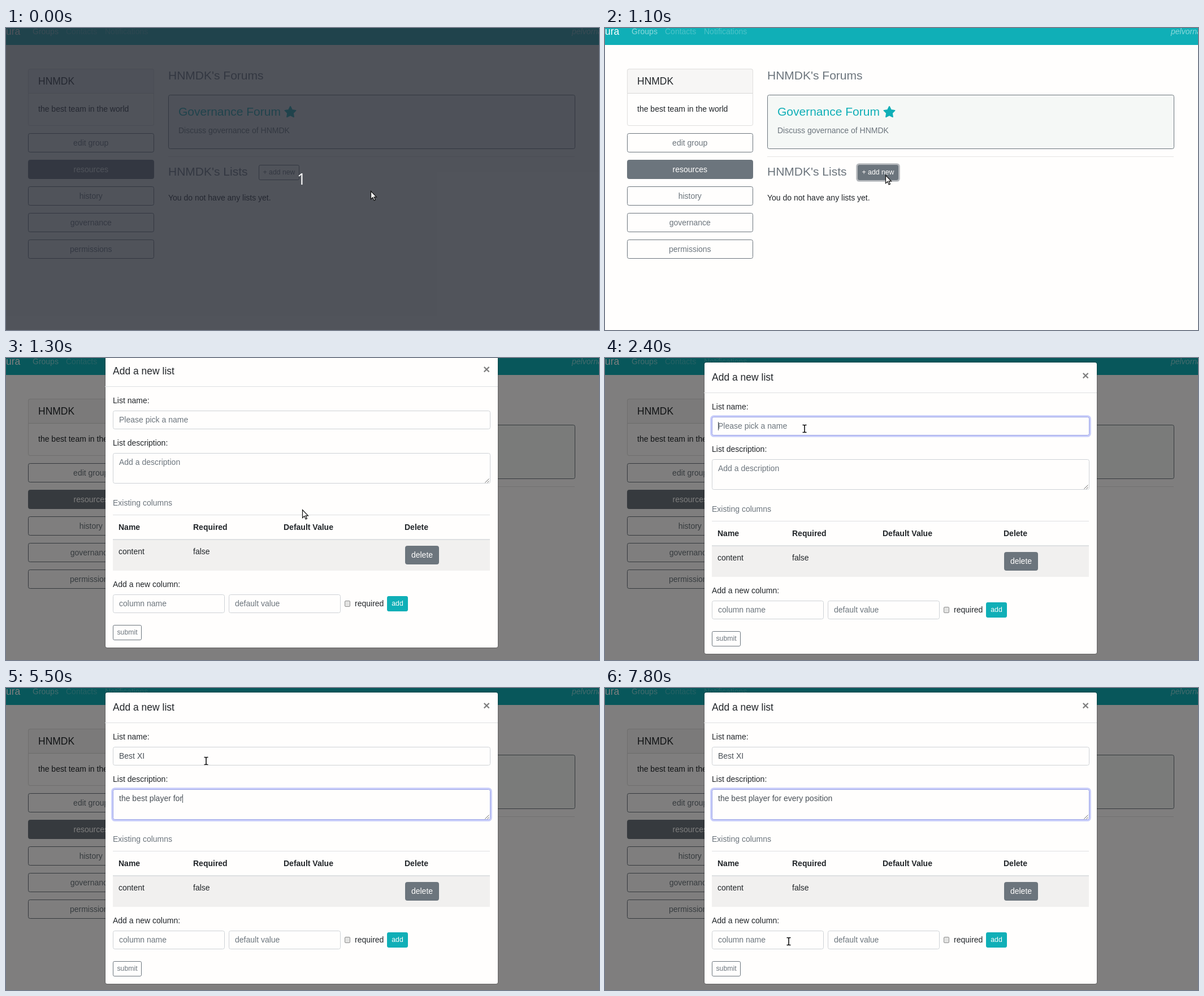
These frames come from a looping animation (1049x534 px, 8 s). An HTML page:

```html
<!DOCTYPE html>
<html lang="en">
<head>
<meta charset="utf-8">
<title>Add a new list</title>
<style>
  html, body { margin: 0; width: 100%; height: 100%; overflow: hidden; background: #fffefd; }
  body { position: relative; font: 14px/30px "Liberation Sans", Arial, sans-serif; color: #212529; }
  div { position: absolute; box-sizing: border-box; white-space: pre; }
  svg { position: absolute; left: 0; top: 0; overflow: visible; }
  .layer { inset: 0; }
  .title { font-size: 17.5px; }
  .heading { font-size: 21px; color: #6c757d; }
  .muted { color: #6c757d; }
  .teal { color: #10afb7; }
  .bold { font-weight: 700; }
  .close { font-size: 21px; font-weight: 700; color: #7f7f7f; }
  .nav { color: rgba(255, 255, 255, .52); }
  .faint { color: rgba(255, 255, 255, .26); }
  .white { color: #fff; }
  .italic { font-style: italic; }
  .bar { background: #10afb7; }
  .card { border: 1px solid rgba(0, 0, 0, .125); border-radius: 3.5px; }
  .cap { background: rgba(0, 0, 0, .03); border-bottom: 1px solid rgba(0, 0, 0, .125); }
  .forum { background: #f5f8f6; border: 1px solid #6c757d; border-radius: 3.5px; }
  .rule { background: rgba(0, 0, 0, .1); }
  .line { background: #dee0e2; }
  .stripe { background: #f1f0ef; }
  .button { border: 1px solid #6c757d; border-radius: 3.5px; text-align: center; color: #6c757d; }
  .small { font-size: 12.25px; border-radius: 2.8px; }
  .filled { background: #6c757d; color: #fffefd; }
  .primary { background: #10afb7; border-color: #10afb7; color: #fffefd; }
  .field { background: #fffefd; border: 1px solid #ced2d6; border-radius: 3.5px; }
  .check { background: #e2e2e1; border: 1px solid #8f8f8f; border-radius: 2px; }
  .panel { background: #fffefd; border: 1px solid rgba(0, 0, 0, .2); border-radius: 4.2px; background-clip: padding-box; }
  .typed { color: #495057; }
  .typed i { display: inline-block; width: 1px; height: 15px; margin-right: -1px; vertical-align: -3px; background: #495057; }
  #backdrop { background: #000; }
  #shade { background: rgba(37, 41, 51, .8); }
  #count { left: 515px; top: 252px; color: #fff; font: 27px/30px "Open Sans", "Noto Sans", sans-serif; }
</style>
</head>
<body>
<div class="layer" id="page"></div>
<div class="layer" id="backdrop"></div>
<div class="layer" id="modal"></div>
<div class="layer" id="shade"><div id="count">1</div></div>
<svg width="1049" height="534">
  <path id="arrow" d="M.5 .5V14.6L3.8 11.6 6.2 16.9 8.4 15.9 6.1 10.8H10.4Z" fill="#fff" stroke="#111" stroke-width="1.2"/>
  <g id="beam" fill="none">
    <path d="M-3.5-6.5H-1L0-5.5 1-6.5H3.5M0-5.5V5.5M-3.5 6.5H-1L0 5.5 1 6.5H3.5" stroke="#fff" stroke-width="3.4"/>
    <path d="M-3.5-6.5H-1L0-5.5 1-6.5H3.5M0-5.5V5.5M-3.5 6.5H-1L0 5.5 1 6.5H3.5" stroke="#111" stroke-width="1.6"/>
  </g>
</svg>
<script>
const $ = id => document.getElementById(id);

// y is the middle of the text line
const text = (x, y, label, cls = '', id = '') =>
  `<div id="${id}" class="${cls}" style="left:${x}px;top:${y - 15}px">${label}</div>`;
const box = (x, y, w, h, cls, label = '', id = '') =>
  `<div id="${id}" class="${cls}" style="left:${x}px;top:${y}px;width:${w}px;height:${h}px;line-height:${h - 2}px">${label}</div>`;

const team = 'HNMDK';
const star = Array.from({ length: 10 }, (_, i) => {
  const r = i % 2 ? 5 : 10, a = i * Math.PI / 5;
  return [503 + r * Math.sin(a), 149 - r * Math.cos(a)].map(v => v.toFixed(1)).join();
}).join(' ');

$('page').innerHTML = [
  box(0, 0, 1049, 30, 'bar'),
  text(0, 6, 'ura', 'title white'),
  text(47, 6, 'Groups', 'nav'),
  text(106, 6, 'Contacts', 'faint'),
  text(175, 6, 'Notifications', 'faint'),
  text(1001, 6, 'pelvorna', 'nav italic'),
  box(39, 72, 222.5, 101, 'card'),
  box(40, 73, 220.5, 43, 'cap'),
  text(57, 94, team, 'title'),
  text(57, 143, 'the best team in the world'),
  ...['edit group', 'resources', 'history', 'governance', 'permissions'].map((label, i) =>
    box(39, 186 + 47 * i, 222.5, 34, i === 1 ? 'button filled' : 'button', label)),
  text(287, 84, team + "'s Forums", 'heading'),
  box(287, 118, 719.5, 95.5, 'forum'),
  text(305, 148, 'Governance Forum', 'heading teal'),
  `<svg><polygon points="${star}" fill="#10afb7" stroke="#10afb7" stroke-width="2" stroke-linejoin="round"/></svg>`,
  text(305, 181, 'Discuss governance of ' + team, 'muted'),
  box(287, 227, 719, 1, 'rule'),
  text(287, 254, team + "'s Lists", 'heading'),
  box(447, 242, 72, 27, 'button small', '+ add new', 'addNew'),
  text(287, 300, 'You do not have any lists yet.')
].join('');

$('modal').innerHTML = [
  box(174.5, 7, 696, 517, 'panel'),
  text(189, 34, 'Add a new list', 'title'),
  text(844, 31, '×', 'close'),
  box(175, 61, 695, 1, 'line'),
  text(189, 86, 'List name:'),
  box(189, 104, 668, 33, 'field', '', 'nameField'),
  text(200, 120, '', 'typed', 'nameText'),
  text(189, 161, 'List description:'),
  box(189, 179, 668, 54, 'field', '', 'noteField'),
  text(200, 195, '', 'typed', 'noteText'),
  '<svg><path d="M847.5 231.5l7-7M851.5 231.5l3-3" stroke="#666" fill="none"/></svg>',
  text(189, 267, 'Existing columns', 'muted'),
  box(189, 288, 667, 1, 'line'),
  ...[[199, 'Name'], [331, 'Required'], [491, 'Default Value'], [705, 'Delete']]
    .map(([x, label]) => text(x, 310, label, 'bold')),
  box(189, 331, 667, 2, 'line'),
  box(189, 333, 667, 54, 'stripe'),
  text(199, 353, 'content'),
  text(331, 353, 'false'),
  box(706, 343, 60, 33, 'button filled', 'delete'),
  text(189, 411, 'Add a new column:'),
  box(189, 429, 198, 33, 'field'),
  text(200, 445, 'column name', 'muted'),
  box(394, 429, 198, 33, 'field'),
  text(405, 445, 'default value', 'muted'),
  box(599, 440, 10, 11, 'check'),
  text(617, 445, 'required'),
  box(674, 432, 37, 27, 'button small primary', 'add'),
  box(189, 483, 51, 27, 'button small', 'submit')
].join('');

// Keys are [tick, value, ...]; one tick is 100 ms
const cursorKeys = [[0, 645, 288], [1, 645, 288], [2, 644, 290], [7, 496, 261], [10, 496, 261], [12, 496, 259],
  [13, 524, 268], [18, 358, 134], [22, 353, 125], [44, 353, 125], [46, 353.5, 129],
  [71, 353.5, 129], [76, 329, 466], [78, 325, 448]];
const nameKeys = [[24, 0], [28, 4], [29, 4], [30, 5], [31, 5], [32, 6], [34, 6], [35, 7]];
const noteKeys = [[37, 0], [38, 1], [40, 1], [48, 11], [49, 11], [55, 19], [58, 23], [61, 26],
  [62, 26], [66, 31], [67, 31], [69, 34]];
const nameFocus = [[21, 0], [22, .4], [23, .4], [24, 1], [35, 1], [36, .4], [37, 0]];
const noteFocus = [[35, 0], [36, .4], [37, 1]];
const backdropKeys = [[11, 0], [12, .28], [13, .5]];
const modalKeys = [[11, 0, -50], [12, .55, -26], [13, 1, -11], [14, 1, -2], [15, 1, 0]];
const fields = [[189, 104, 668, 33], [189, 179, 668, 54], [189, 429, 198, 33], [394, 429, 198, 33]];

function valuesAt(keys, tick) {
  const next = keys.findIndex(key => key[0] > tick);
  if (next < 1) return keys.at(next).slice(1);
  const a = keys[next - 1], b = keys[next], k = (tick - a[0]) / (b[0] - a[0]);
  return a.slice(1).map((v, i) => v + (b[i + 1] - v) * k);
}

const inside = (x, y, [left, top, w, h]) => x >= left && x < left + w && y >= top && y < top + h;

function showField(name, placeholder, content, keys, focusKeys, tick, caretOn) {
  const [focus] = valuesAt(focusKeys, tick);
  const typed = content.slice(0, Math.round(valuesAt(keys, tick)[0]));
  const caret = caretOn ? '<i></i>' : '';
  $(name + 'Text').innerHTML = typed ? typed + caret : `${caret}<span class="muted">${placeholder}</span>`;
  $(name + 'Field').style.cssText += `;box-shadow:0 0 0 ${2.8 * focus}px rgba(200,205,250,${focus})`
    + `;border-color:${focus ? `color-mix(in srgb, #9ba3e6 ${focus * 100}%, #ced2d6)` : '#ced2d6'}`;
}

function draw(tick) {
  const [x, y] = valuesAt(cursorKeys, tick);
  const [opacity, shift] = valuesAt(modalKeys, tick);

  $('shade').hidden = tick >= 2;
  $('shade').style.display = tick < 2 ? '' : 'none';
  $('backdrop').style.opacity = valuesAt(backdropKeys, tick)[0];
  $('modal').style.opacity = opacity;
  $('modal').style.transform = `translateY(${shift}px)`;

  const hover = tick < 12 && inside(x, y, [447, 242, 72, 27]);
  const button = $('addNew').style;
  button.background = hover ? '#6c757d' : tick === 12 ? '#b0b4b8' : '';
  button.color = hover ? '#fffefd' : tick === 12 ? '#a5abb0' : '';
  button.boxShadow = tick >= 10 ? '0 0 0 2.8px rgba(108,117,125,.5)' : '';

  showField('name', 'Please pick a name', 'Best XI', nameKeys, nameFocus, tick, tick >= 22 && tick < 36);
  showField('note', 'Add a description', 'the best player for every position', noteKeys, noteFocus, tick,
    tick >= 36 && tick < 74);

  const overField = opacity === 1 && fields.some(field => inside(x, y, field));
  $('arrow').style.display = overField ? 'none' : '';
  $('beam').style.display = overField ? '' : 'none';
  for (const id of ['arrow', 'beam']) $(id).setAttribute('transform', `translate(${Math.round(x)} ${Math.round(y)})`);
}

function loop() {
  draw(Math.floor(performance.now() % 8000 / 100));
  requestAnimationFrame(loop);
}
loop();
</script>
</body>
</html>
```
